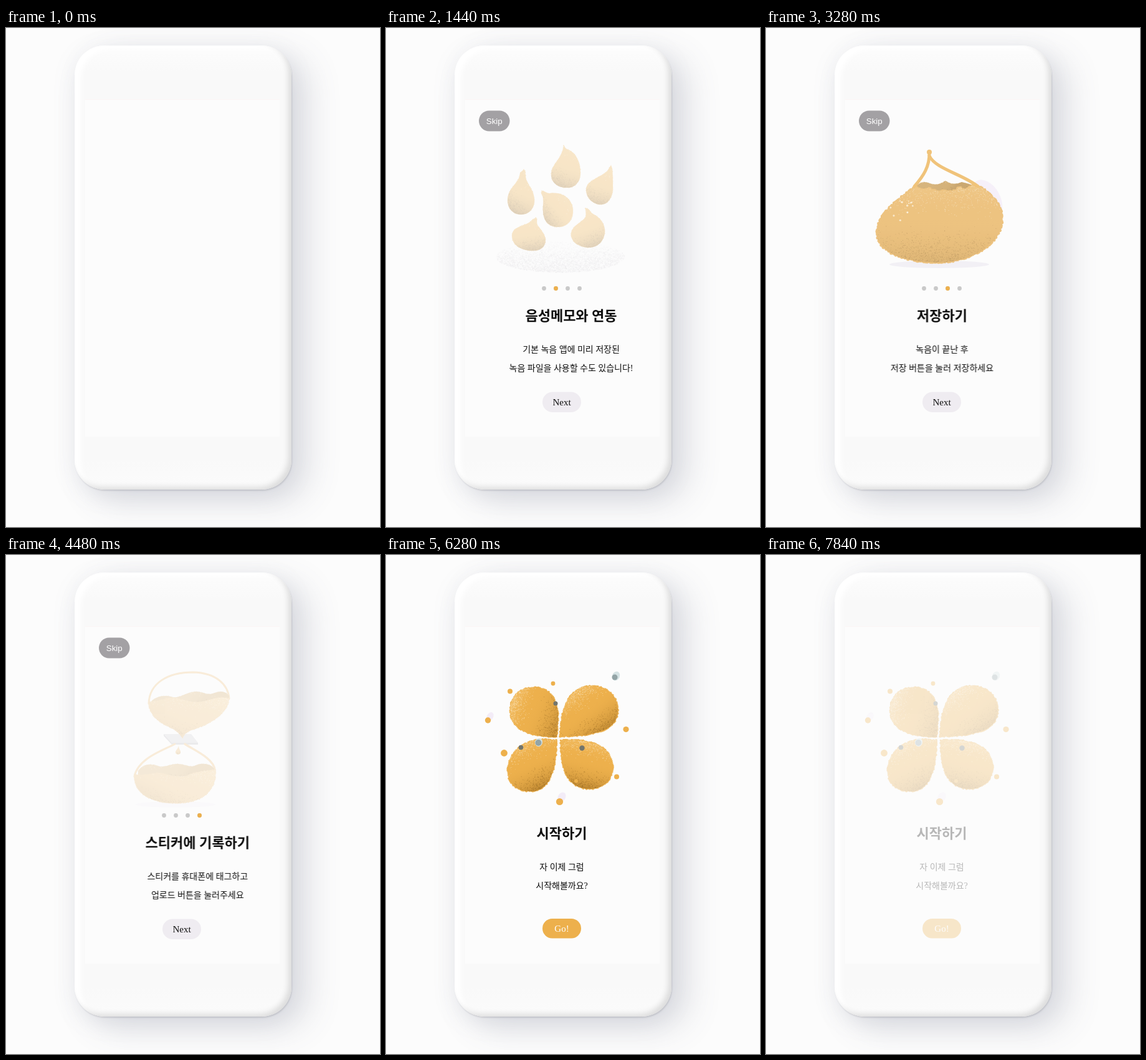
These frames come from a looping animation (600 px wide and 800 px high, 7.88 s). An HTML page with a canvas:

```html
<!DOCTYPE html>
<html lang="ko">
<head>
<meta charset="utf-8">
<title>Onboarding</title>
<style>
  html, body { margin: 0; width: 100%; height: 100%; overflow: hidden; background: #fcfcfc; }
  #stage { position: relative; width: 600px; height: 800px; overflow: hidden; }
  #stage > * { position: absolute; left: 0; top: 0; }
  #stage > #phone {
    left: 110px; top: 28px; width: 348px; height: 712px; border-radius: 48px;
    background: linear-gradient(#fdfdfd, #f9f9f9 6%, #f9f9f9 93%, #fbfbfb);
    box-shadow:
      inset -6px -5px 10px -1px rgba(0, 0, 0, .12),
      inset 10px 6px 9px #fff,
      1px 2px 2px rgba(90, 90, 100, .18),
      26px 18px 54px rgba(85, 90, 115, .19),
      0 8px 36px rgba(130, 140, 165, .13);
  }
  #stage > #screen {
    left: 127px; top: 114px; width: 312px; height: 541px; box-sizing: border-box;
    background: #fcfcfc; border-top: 1px solid #fbf5f4;
  }
  text { font-family: "Liberation Serif", "Noto Sans CJK KR", "Noto Sans CJK", serif; text-anchor: middle; font-size: 14px; fill: #0c0c0c; }
  .title { font-weight: 700; font-size: 22px; }
  .btn { font-size: 15px; }
  .skip { font-family: "Liberation Sans", Arial, sans-serif; font-size: 13.33px; }
</style>
</head>
<body>
<div id="stage">
  <div id="phone"></div>
  <div id="screen"></div>
</div>
<script>
const LOOP = 7880, WIDTH = 312, GOLD = '#edb04c', SAND = '#efbd70';
const START = [120, 1200, 2840, 4280, 6120];
const CUT = START.map(t => t + 20);
const SLIDE = 560, FADE = 800, EXPO = 'cubic-bezier(.16,1,.3,1)';
const NS = 'http://www.w3.org/2000/svg';
const stage = document.getElementById('stage');

let seed = 11;
const rnd = () => (seed = seed * 16807 % 2147483647) / 2147483647;

function node(tag, parent, attrs, text) {
  const el = document.createElementNS(NS, tag);
  for (const k in attrs) el.setAttribute(k, attrs[k]);
  if (text) el.textContent = text;
  if (parent) parent.append(el);
  return el;
}

// steps: [time, value, easing]
function track(el, prop, steps) {
  const all = [[0, steps[0][1]], ...steps, [LOOP, steps[steps.length - 1][1]]];
  el.animate(all.map(([t, v, easing = 'linear']) => ({ offset: t / LOOP, [prop]: v, easing })),
    { duration: LOOP, iterations: Infinity });
}
const show = (el, from, to) =>
  track(el, 'opacity', [[from, 0], [from, 1], [to, 1], [to, 0]]);
const fadeIn = (el, from, dur, to, easing) =>
  track(el, 'opacity', [[from, 0, easing], [from + dur, 1], [to, 1], [to, 0]]);
const lastScreen = el =>
  track(el, 'opacity', [[CUT[4], 0], [CUT[4], 1], [7640, 1], [LOOP, .145]]);

// --- grainy drawing ---
function canvas() {
  const c = document.createElement('canvas');
  c.width = 600; c.height = 800;
  stage.append(c);
  return c.getContext('2d');
}

function dot(g, x, y, r, color, ry = r, turn = 0) {
  g.fillStyle = color;
  g.beginPath();
  g.ellipse(x, y, r, ry, turn, 0, 7);
  g.fill();
}

// dir points to the dark side
function blob(g, d, { color = GOLD, dir = [.3, 1], dark = .6, light = .3, rough = 1 } = {}) {
  const p = node('path', null, { d }), len = p.getTotalLength(), pts = [];
  for (let s = 0; s < len; s += 2.6) pts.push(p.getPointAtLength(s));
  const xs = pts.map(q => q.x), ys = pts.map(q => q.y);
  const x0 = Math.min(...xs), y0 = Math.min(...ys);
  const w = Math.max(...xs) - x0, h = Math.max(...ys) - y0;
  const shape = new Path2D(d);
  g.fillStyle = color;
  g.fill(shape);
  for (const q of pts) dot(g, q.x, q.y, rough * (.5 + rnd()), color);
  g.save();
  g.clip(shape);
  const [dx, dy] = dir, n = Math.hypot(dx, dy);
  const cx = x0 + w / 2, cy = y0 + h / 2;
  const rx = dx / n * w / 2, ry = dy / n * h / 2;
  const grad = g.createLinearGradient(cx - rx, cy - ry, cx + rx, cy + ry);
  grad.addColorStop(0, `rgba(255,226,170,${light * .5})`);
  grad.addColorStop(.4, 'rgba(240,180,80,0)');
  grad.addColorStop(1, `rgba(140,92,20,${dark * .75})`);
  g.fillStyle = grad;
  g.fillRect(x0, y0, w, h);
  for (let i = w * h; i > 0; i--) {
    const a = rnd() * 2 - 1, b = rnd() * 2 - 1, u = (a * dx + b * dy) / n;
    const pick = rnd(), size = .6 + rnd() * .5;
    if (pick > u * u * (u > 0 ? dark : light)) continue;
    g.fillStyle = u > 0 ? 'rgba(120,82,24,.36)' : 'rgba(255,238,208,.55)';
    g.fillRect(cx + a * w / 2, cy + b * h / 2, size, size);
  }
  g.restore();
}

function line(g, d, width, color = GOLD) {
  g.strokeStyle = color;
  g.lineWidth = width;
  g.lineCap = 'round';
  g.stroke(new Path2D(d));
}

// denser and darker towards the lower rim
function dust(g, x, y, rx, ry, count) {
  for (let i = 0; i < count; i++) {
    const a = rnd() * 6.283, r = Math.sqrt(rnd()), v = Math.sin(a) * r;
    const depth = (v + 1) / 2;
    if (rnd() > .15 + depth * .85) continue;
    const tone = 195 + rnd() * 45 | 0;
    dot(g, x + Math.cos(a) * r * rx, y + v * ry, .4 + rnd() * .6, `rgba(${tone},${tone - 3},${tone + 2},${.2 + depth * .4})`);
  }
}

const paint = [
  g => {
    dust(g, 280, 376, 84, 14, 2600);
    blob(g, 'M288 190C294 222 358 252 358 308C358 350 326 374 282 374C236 374 204 348 204 308C204 258 278 240 288 190Z', { rough: 1.6 });
  },
  g => {
    dust(g, 280, 367, 103, 25, 8000);
    [
      ['M285 188Q288 194 292 195C306 200 312 218 312 232C312 248 302 257 289 256C275 256 265 247 265 235C265 218 283 210 285 188Z', -.4],
      ['M221 227C225 228 223 236 225 243C230 255 238 262 238 276C238 290 229 299 217 299C203 299 195 289 195 275C196 255 215 248 215 232Z', -.6],
      ['M361 220C364 226 364 240 364 255C364 272 356 283 345 283C332 283 321 272 321 259C322 243 345 240 355 229Z', -.3],
      ['M250 261C254 261 257 265 263 265C285 262 300 276 300 293C300 309 290 319 276 319C262 319 253 310 252 295C251 283 255 275 249 264Z', -1.2],
      ['M241 304C244 308 240 312 243 316C249 324 256 332 256 340C256 352 246 358 233 357C215 356 202 347 202 333C202 316 228 318 235 307Z', .1],
      ['M320 289C327 289 326 294 332 298C344 304 351 314 351 325C351 342 339 352 325 352C309 351 297 343 297 331C298 313 320 312 321 299Z', .4]
    ].forEach(([d, lean]) => blob(g, d, { dir: [lean, 1], dark: .9, light: .1, rough: .6 }));
  },
  g => {
    dot(g, 354, 275, 22, '#f4edf8', 34, -.5);
    dot(g, 278, 379, 80, '#efedf3', 6);
    blob(g, 'M238 256Q250 243 262 249Q275 254 288 245Q300 254 314 247Q326 250 334 253L330 262 240 262Z', { color: '#c7984c', dark: .3, light: .1, rough: .6 });
    blob(g, 'M240 253C225 268 178 292 178 328C178 362 228 376 276 376C330 376 379 345 379 306C379 280 355 258 333 250Q322 263 310 255Q300 265 286 260Q272 264 262 256Q250 262 240 253Z',
      { color: '#e8af55', dir: [0, 1], dark: .3, light: .2, rough: 1.8 });
    line(g, 'M262 199C263 222 252 238 238 254', 5);
    line(g, 'M262 205C272 226 315 234 340 254', 5);
    dot(g, 262, 199, 4, GOLD);
    for (let i = 0; i < 14; i++) dot(g, 196 + rnd() * 42, 276 + rnd() * 36, .8 + rnd(), 'rgba(255,246,228,.7)');
  },
  g => {
    const back = { color: '#d9ae68', dark: .2, light: .1, rough: .5 };
    const front = { color: SAND, dir: [-.2, 1], dark: .26, light: .2, rough: .8 };
    dot(g, 272, 400, 64, '#f2eff6', 4.5);
    g.fillStyle = '#b9b7bd';
    g.fill(new Path2D('M253 287L266 301 308 301 308 304 266 304 253 290Z'));
    g.fillStyle = '#cfcdd3';
    g.fill(new Path2D('M253 287L297 287 308 301 266 301Z'));
    line(g, 'M229 238C230 205 260 188 300 188C338 189 356 208 358 230', 3, SAND);
    blob(g, 'M232 236C240 226 255 224 268 228C280 230 290 219 305 219C318 220 325 226 335 221C345 217 353 219 358 226L356 236 232 240Z', back);
    blob(g, 'M229 235C245 236 255 228 268 229C285 231 295 237 310 236C330 232 340 226 358 230C357 255 325 272 300 280C290 283 286 287 283 294C278 285 272 280 258 274C240 265 228 252 229 235Z', front);
    line(g, 'M271 303C255 312 212 325 206 355', 3, SAND);
    line(g, 'M287 303C300 312 334 326 335 345', 3.4, SAND);
    blob(g, 'M212 346C220 335 232 334 243 338C255 342 262 335 275 335C288 335 295 342 305 337C318 332 330 336 335 344L333 354 212 356Z', back);
    blob(g, 'M206 351C220 356 235 348 250 350C265 354 275 357 290 354C305 347 320 346 336 344C338 370 325 398 272 398C230 398 203 380 206 351Z', front);
    blob(g, 'M277 306C277 311 280 313 280 316C280 321 272 321 272 316C272 313 276 311 277 306Z', { color: SAND, dark: .4, rough: .3 });
  },
  g => {
    const petal = (d, dir, dark = .55) => blob(g, d, { dir, dark, light: .5, rough: 1.3 });
    petal('M274 292C240 292 199 284 199 250C199 226 215 212 238 212C270 213 277 240 276 265Z', [1, .4], .35);
    petal('M279 291C280 250 291 210 330 210C356 210 372 226 372 249C372 279 340 291 279 291Z', [.7, 1]);
    petal('M273 297C275 330 267 379 233 379C209 379 195 366 195 345C196 313 225 295 255 295Z', [.5, 1], .6);
    petal('M280 297C300 295 363 294 364 340C364 361 348 375 327 375C291 375 280 345 280 297Z', [-.2, 1], .6);
    dot(g, 167, 259, 5, '#f3ecf7', 7.5, .5);
    dot(g, 282, 388, 6, '#f3ecf7', 8, .5);
    dot(g, 369, 194, 6, '#d5e2e3', 7.5, .4);
    dot(g, 367, 196, 4.5, '#93a4a6');
    dot(g, 245, 300.5, 6, '#d5e2e3', 6.5, .4);
    dot(g, 244.5, 301, 5, '#93a4a6');
    [[272, 238, 3.5], [216.5, 308.5, 3.8], [314.5, 309.5, 4.2]].forEach(([x, y, r]) => dot(g, x, y, r, '#73756c'));
    [[268, 206, 3.4], [199, 218.5, 4], [163.5, 265, 4.7], [189.5, 317.5, 5.4], [385, 279.5, 4.6],
     [370, 355.5, 4], [278.5, 395.5, 5.6], [293, 259, 3], [305, 362.5, 3]].forEach(([x, y, r]) => dot(g, x, y, r, GOLD));
  }
];

const art = paint.map(draw => {
  const g = canvas();
  draw(g);
  return g.canvas;
});
fadeIn(art[0], START[0], 500, CUT[1], 'ease-out');
fadeIn(art[1], START[1], FADE, CUT[2], 'linear');
fadeIn(art[2], START[2], FADE, CUT[3], 'ease-out');
fadeIn(art[3], START[3], FADE, CUT[4], 'linear');
lastScreen(art[4]);

// --- interface ---
const svg = node('svg', stage, { width: 600, height: 800 });
const clip = node('clipPath', svg, { id: 'view' });
node('rect', clip, { x: 127, y: 114, width: WIDTH, height: 541 });
const view = node('g', svg, { 'clip-path': 'url(#view)' });

function pill(parent, x, y, w, h, fill, label, cls, base, ink) {
  node('rect', parent, { x, y, width: w, height: h, rx: h / 2, fill });
  node('text', parent, { x: x + w / 2, y: base, class: cls, style: `fill:${ink}` }, label);
}

const chrome = node('g', view);
pill(chrome, 149, 132.5, 49.5, 33, '#a3a1a4', 'Skip', 'skip', 153.5, '#fff');
pill(chrome, 251, 583.5, 62, 32.5, '#efecf1', 'Next', 'btn', 605, '#111');
for (let i = 0; i < 4; i++) {
  const at = { cx: 253.5 + 19 * i, cy: 417.5, r: 3.4 };
  node('circle', chrome, { ...at, fill: '#c9c9c9' });
  show(node('circle', chrome, { ...at, fill: GOLD }), i ? CUT[i] : 0, CUT[i + 1]);
}
fadeIn(chrome, START[0], 500, CUT[4], 'ease-out');

const copy = [
  ['녹음하기', '녹음 버튼을 눌러', '녹음을 시작하세요'],
  ['음성메모와 연동', '기본 녹음 앱에 미리 저장된', '녹음 파일을 사용할 수도 있습니다!'],
  ['저장하기', '녹음이 끝난 후', '저장 버튼을 눌러 저장하세요'],
  ['스티커에 기록하기', '스티커를 휴대폰에 태그하고', '업로드 버튼을 눌러주세요'],
  ['시작하기', '자 이제 그럼', '시작해볼까요?']
];
const shift = x => `translateX(${x}px)`;

copy.forEach(([title, ...lines], i) => {
  const g = node('g', view), up = i === 4 ? 15 : 0;
  node('text', g, { x: 282, y: 469 - up, class: 'title' }, title);
  lines.forEach((s, k) => node('text', g, { x: 282, y: 520 + 30 * k - up }, s));
  if (i === 4) {
    pill(g, 251, 583, 62, 31.5, GOLD, 'Go!', 'btn', 603.5, '#fff');
    return lastScreen(g);
  }
  const steps = i ? [[START[i], shift(WIDTH), EXPO], [START[i] + SLIDE, shift(0)]] : [[0, shift(0)]];
  if (i < 3) steps.push([START[i + 1], shift(0), EXPO], [START[i + 1] + SLIDE, shift(-WIDTH)]);
  track(g, 'transform', steps);
  if (i === 0) fadeIn(g, START[0], 500, START[1] + SLIDE, 'ease-out');
  if (i === 3) show(g, START[3], CUT[4]);
});
</script>
</body>
</html>
```
